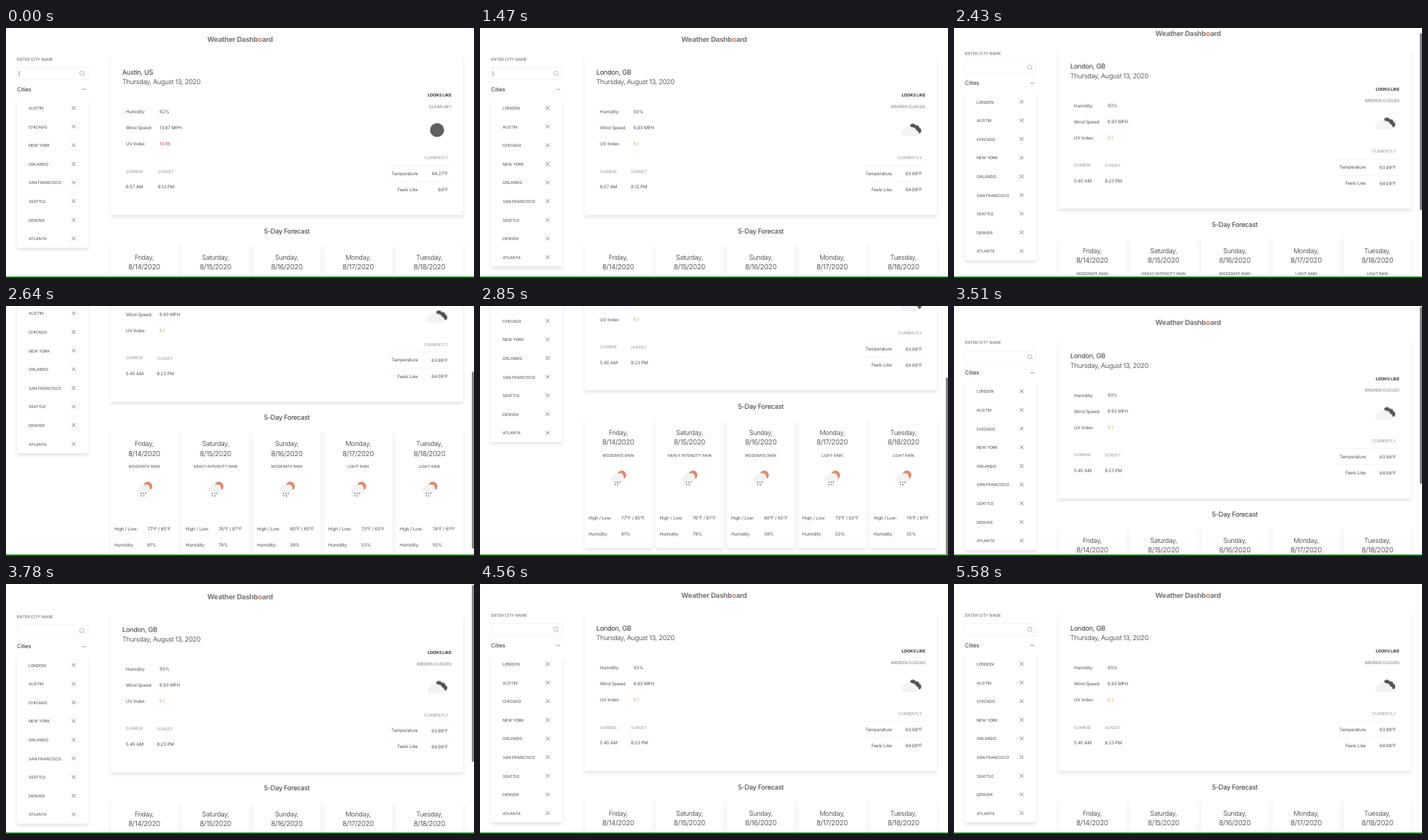
An HTML page that plays this animation: 640 px wide and 343 px high, repeating every 5.7 s.

```html
<!DOCTYPE html>
<html lang="en">
<head>
<meta charset="utf-8">
<title>Weather Dashboard</title>
<style>
@property --y { syntax: "<number>"; inherits: true; initial-value: 0; }
@property --typed { syntax: "<integer>"; inherits: true; initial-value: 0; }

html, body { margin: 0; width: 100%; height: 100%; overflow: hidden; background: #fff; }
#stage {
  position: relative; width: 640px; height: 343px; overflow: hidden;
  animation: scroll 5.7s linear infinite;
}
#page {
  position: absolute; left: 0; top: 0;
  transform: translateY(calc(var(--y) * -1px));
}
#thumb {
  position: absolute; left: 636.5px; top: 0; width: 3px; height: 243px;
  border-radius: 2px; background: #858585;
  transform: translateY(clamp(1px, 1px + var(--y) * .71px, 98px));
  animation: thumb 5.7s linear infinite;
}
#edge { position: absolute; left: 0; bottom: 0; width: 100%; height: 1.6px; background: #177317; }

text {
  font-family: Inter, "Open Sans", sans-serif; letter-spacing: -.03em;
  text-rendering: geometricPrecision; white-space: pre;
}
.small { letter-spacing: -.02em; }
.card { fill: #fff; filter: drop-shadow(0 3px 2.2px rgba(0, 0, 0, .1)); }
.line { fill: none; stroke: #f1f1f1; stroke-width: .8; }
.cross { stroke: #666; stroke-width: .8; }

.step { animation: 5.7s step-end infinite; }
.before { animation-name: before; }
.after { animation-name: after; }
.sunBefore { animation-name: sunBefore; }
.sunAfter { animation-name: sunAfter; }
.added { animation-name: added; }
.pushed { animation-name: pushed; }
.grow { animation-name: grow; }
.typing { animation-name: typing; }
.caret { animation-name: caret; transform: translateX(calc(var(--typed) * 3.5px)); }

@keyframes before { 0% { opacity: 1 } 23.158%, 100% { opacity: 0 } }
@keyframes after { 0% { opacity: 0 } 23.158%, 100% { opacity: 1 } }
@keyframes sunBefore { 0% { opacity: 1 } 28.421%, 100% { opacity: 0 } }
@keyframes sunAfter { 0% { opacity: 0 } 28.421%, 100% { opacity: 1 } }
@keyframes added { 0% { opacity: 0 } 21.579%, 100% { opacity: 1 } }
@keyframes pushed { 0% { transform: none } 21.579%, 100% { transform: translateY(25.6px) } }
@keyframes grow { 0% { height: 204.5px } 21.579%, 100% { height: 230px } }
@keyframes caret {
  0% { opacity: 1 } 5.263% { opacity: 0 } 9.474% { opacity: 1 } 31.053%, 100% { opacity: 0 }
}
@keyframes typing {
  0% { --typed: 0 } 3.158% { --typed: 1 } 9.474% { --typed: 2 } 11.053% { --typed: 3 }
  12.632% { --typed: 4 } 13.684% { --typed: 5 } 15.263% { --typed: 6 } 21.579%, 100% { --typed: 0 }
}
@keyframes scroll {
  0%, 41.053% { --y: 0 } 42.632% { --y: 8 } 43.684% { --y: 34 } 44.737% { --y: 76 }
  45.789% { --y: 114 } 46.316% { --y: 125 } 47.368% { --y: 137 } 48.421% { --y: 141.5 }
  50% { --y: 140.5 } 51.579%, 52.105% { --y: 139 }
  53.684% { --y: 118 } 55.263% { --y: 78 } 56.842% { --y: 40 } 58.421% { --y: 13 }
  60% { --y: -5 } 60.877% { --y: -8.5 } 61.579% { --y: -7.5 } 63.158% { --y: -5 }
  65.789% { --y: -2 } 68.421% { --y: -.5 } 71.053%, 100% { --y: 0 }
}
@keyframes thumb {
  0%, 41.5% { opacity: 0 } 41.6%, 67% { opacity: 1 } 71.053%, 100% { opacity: 0 }
}
</style>
</head>
<body>
<div id="stage">
  <svg id="page" width="640" height="490"></svg>
  <div id="thumb"></div>
  <div id="edge"></div>
</div>
<script>
// y is the middle of the capitals
const text = (x, y, size, str, { anchor = "start", fill = "#505050", weight = 400 } = {}) =>
  `<text class="${size < 8 ? "small" : ""}" x="${x}" y="${y + size * .36}" font-size="${size}"
    text-anchor="${anchor}" font-weight="${weight}" style="fill:${fill}">${str}</text>`;
const card = (x, y, w, h, cls = "") =>
  `<rect class="card ${cls}" x="${x}" y="${y}" width="${w}" height="${h}" rx="1"/>`;
const line = (x1, x2, y) => `<path class="line" d="M${x1} ${y}H${x2}"/>`;
const group = (cls, body) => `<g class="step ${cls}">${body}</g>`;
const circle = (x, y, r, fill) => `<circle cx="${x}" cy="${y}" r="${r}" fill="${fill}"/>`;

const end = { anchor: "end" }, mid = { anchor: "middle" };
const pale = { fill: "#999" };
const BODY = 6.2, CAPS = 5.6, HEAD = 9.15;

const cloud = (x, y, s) =>
  `<path transform="translate(${x} ${y}) scale(${s})" fill="#f3f3f3" stroke="#fff" stroke-width="1.2" paint-order="stroke"
    d="M-8 6a4.3 4.3 0 0 1-1-8.5A6.3 6.3 0 0 1 2-5.5A5 5 0 0 1 8-1.5A3.9 3.9 0 0 1 8.5 6Z"/>`;

const clearSky = circle(589.5, 140, 9.6, "#5f5f5f");
const brokenClouds =
  circle(592, 135.5, 4.3, "#555") + circle(597, 137.2, 3.8, "#555") +
  circle(599.8, 140.8, 3.7, "#555") + cloud(588.3, 142.3, .98);

const rain = (x, y) => {
  const drops = [[-4.5, 5], [-1.2, 5.3], [2, 5], [-4, 8.3], [-.5, 8.6]]
    .map(([dx, dy]) => `<path d="M${x + dx} ${y + dy}l-.9 1.4" stroke="#444" stroke-width="1.1"/>`);
  return circle(x + 4.3, y - 4, 6.2, "#e08b6e") + circle(x + 2, y - 1.6, 4.8, "#fff") +
    cloud(x - 1.2, y - .2, .78) + drops.join("");
};

const city = (name, i) => {
  const y = 110 + i * 25.6;
  return text(31, y, CAPS, name) +
    `<path class="cross" d="M90 ${y - 2.9}l5 5m0-5l-5 5"/>`;
};

const sidebar = () => {
  const cities = ["AUSTIN", "CHICAGO", "NEW YORK", "ORLANDO", "SAN FRANCISCO", "SEATTLE", "DENVER", "ATLANTA"];
  const letters = [..."London"]
    .map((c, i) => `<tspan style="fill-opacity:calc(var(--typed) - ${i})">${c}</tspan>`).join("");
  return text(15, 43, CAPS, "ENTER CITY NAME", { fill: "#666" }) +
    `<rect class="line" x="15" y="54.4" width="97" height="16"/>` +
    `<g fill="none" stroke="#aaa" stroke-width=".8"><circle cx="103.6" cy="62" r="2.9"/><path d="M105.7 64.1l2.2 2.4"/></g>` +
    group("typing", text(17, 62.5, 6.2, letters) +
      `<rect class="step caret" x="17.6" y="59" width=".8" height="7" fill="#777"/>`) +
    text(15, 84, 7.7, "Cities", { fill: "#333" }) +
    `<path d="M104 84.2h6" stroke="#888" stroke-width=".8"/>` +
    card(15, 97, 97.5, 204.5, "step grow") +
    group("added", city("LONDON", 0)) +
    group("pushed", cities.map(city).join(""));
};

const reading = d => group(d.cls,
  text(159, 61, HEAD, d.place, { fill: "#333" }) +
  text(210, 115, BODY, d.humidity) +
  text(210, 137, BODY, d.wind) +
  text(210, 159, BODY, d.uv, { fill: d.uvFill }) +
  text(d.setX, 196.5, CAPS, "SUNSET", pale) +
  text(609, 108.3, 5.7, d.sky, { ...end, fill: "#777" }) + d.icon +
  text(604.5, 199.3, BODY, d.temp, end) +
  text(604.5, 221.5, BODY, d.feels, end));

const today = () =>
  card(143, 39.5, 482, 217) +
  text(159, 74, HEAD, "Thursday, August 13, 2020", { weight: 300, fill: "#333" }) +
  text(164, 115, BODY, "Humidity:") +
  text(164, 137, BODY, "Wind Speed:") +
  text(164, 159, BODY, "UV Index:") +
  text(164, 196.5, CAPS, "SUNRISE", pale) +
  text(609, 92.3, 5.7, "LOOKS LIKE", { ...end, weight: 700, fill: "#333" }) +
  text(604.5, 177.8, CAPS, "CURRENTLY", { ...end, ...pale }) +
  line(523, 609, 188.3) + line(523, 609, 210.4) +
  text(563, 199.3, BODY, "Temperature", end) +
  text(563, 221.5, BODY, "Feels Like", end) +
  reading({ cls: "before", place: "Austin, US", humidity: "62%", wind: "13.87 MPH", uv: "10.86",
    uvFill: "#b8546c", setX: 207.7, sky: "CLEAR SKY", icon: clearSky, temp: "84.27°F", feels: "84°F" }) +
  reading({ cls: "after", place: "London, GB", humidity: "93%", wind: "6.93 MPH", uv: "6.1",
    uvFill: "#dfa15c", setX: 206.2, sky: "BROKEN CLOUDS", icon: brokenClouds, temp: "63.99°F", feels: "64.09°F" }) +
  group("sunBefore", text(164, 218.2, BODY, "6:57 AM") +
    group("before", text(207.7, 218.2, BODY, "8:12 PM")) +
    group("after", text(206.2, 218.2, BODY, "8:12 PM"))) +
  group("sunAfter", text(164, 218.2, BODY, "5:45 AM") + text(206.2, 218.2, BODY, "8:23 PM"));

const forecast = () => {
  const days = [
    ["Friday", "MODERATE RAIN", "77°F / 65°F", "61%"],
    ["Saturday", "HEAVY INTENSITY RAIN", "76°F / 67°F", "74%"],
    ["Sunday", "MODERATE RAIN", "80°F / 65°F", "39%"],
    ["Monday", "LIGHT RAIN", "73°F / 63°F", "53%"],
    ["Tuesday", "LIGHT RAIN", "74°F / 61°F", "55%"],
  ];
  const boxes = days.map((_, i) => card(143 + i * 97.5, 295.5, 92.3, 177)).join("");
  return text(384, 278.3, HEAD, "5-Day Forecast", { ...mid, fill: "#333" }) + boxes +
    days.map(([day, sky, range, humidity], i) => {
      const x = 143 + i * 97.5, c = x + 46;
      const light = { ...mid, weight: 300, fill: "#333" };
      return text(c, 314.3, HEAD, day + ",", light) +
        text(c, 327.3, 9.6, `8/${14 + i}/2020`, light) +
        text(c, 345.6, 5.4, sky, mid) +
        rain(c + .5, 376.5) +
        text(x + 5.3, 431.4, BODY, "High / Low:") + text(x + 50.2, 431.4, BODY, range) +
        text(x + 5.3, 453.2, BODY, "Humidity:") + text(x + 50.2, 453.2, BODY, humidity);
    }).join("");
};

document.getElementById("page").innerHTML =
  text(320, 15.5, 9.7, `Weather Dashb<tspan fill="#e2785f">o</tspan>ard`,
    { ...mid, weight: 700, fill: "#777" }) +
  sidebar() + today() + forecast();
</script>
</body>
</html>
```
